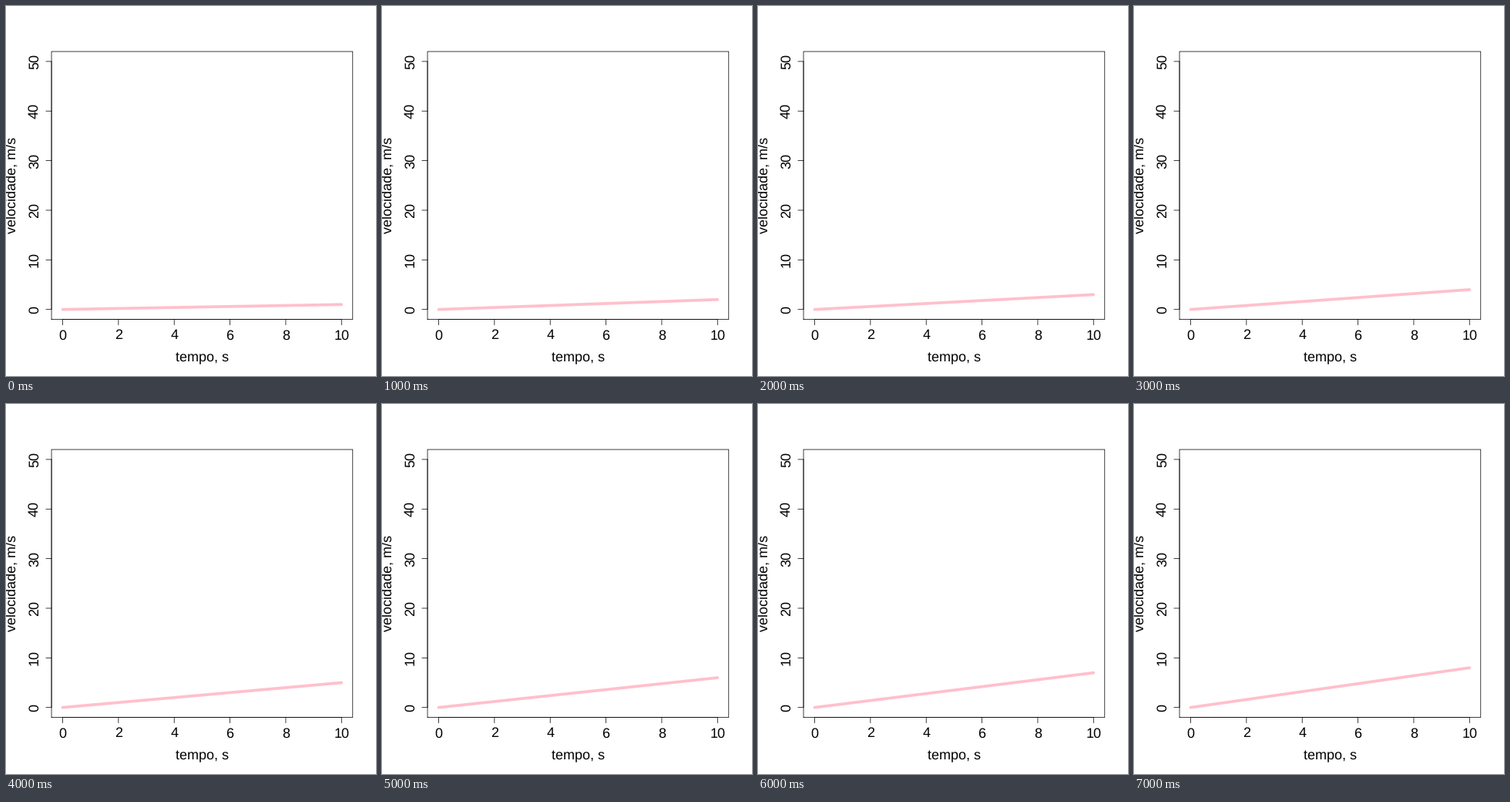
Animation of 480x480 px, one loop 8 s. Source, as a matplotlib script:

```python
import matplotlib.pyplot as plt
from matplotlib.animation import FuncAnimation

SIZE, DPI = 480, 72
LEFT, RIGHT, TOP, BOTTOM = 59.04, 449.76, 59.04, 406.56
TICK, THIN, THICK = 7.2, 0.75, 3.75
FRAMES, INTERVAL = 8, 1000

plt.rcParams.update({
    "font.family": "Liberation Sans",
    "font.size": 18,
    "text.hinting": "none",
    "lines.solid_capstyle": "round",
    "lines.solid_joinstyle": "round",
})

fig = plt.figure(figsize=(SIZE / DPI, SIZE / DPI), dpi=DPI, facecolor="white")
ax = fig.add_axes([0, 0, 1, 1])
ax.set_xlim(0, SIZE)
ax.set_ylim(SIZE, 0)
ax.axis("off")


def px(t):
    """Time in seconds to stage x, with 4% padding at both ends."""
    return LEFT + (RIGHT - LEFT) * (t / 10 + 0.04) / 1.08


def py(v):
    """Speed in m/s to stage y, with 4% padding at both ends."""
    return BOTTOM - (BOTTOM - TOP) * (v / 50 + 0.04) / 1.08


def stroke(xs, ys, color="black", width=THIN):
    return ax.plot(xs, ys, color=color, lw=width, snap=False)[0]


def label(x, y, text, angle=0):
    ax.text(x, y, text, rotation=angle, rotation_mode="anchor",
            ha="center", va="baseline", color="black")


curve = stroke([], [], "pink", THICK)

# Axes, ticks and frame
stroke([px(0), px(10)], [BOTTOM, BOTTOM])
for t in range(0, 11, 2):
    stroke([px(t), px(t)], [BOTTOM, BOTTOM + TICK])
    label(px(t), 432.48, str(t))

stroke([LEFT, LEFT], [py(0), py(50)])
for v in range(0, 51, 10):
    stroke([LEFT, LEFT - TICK], [py(v), py(v)])
    label(41.76, py(v), str(v), 90)

stroke([LEFT, RIGHT, RIGHT, LEFT, LEFT], [BOTTOM, BOTTOM, TOP, TOP, BOTTOM])

label((LEFT + RIGHT) / 2, 461.28, "tempo, s")
label(12.96, (TOP + BOTTOM) / 2, "velocidade, m/s", 90)


def update(i):
    acceleration = 0.1 * (i + 1)
    curve.set_data([px(0), px(10)], [py(0), py(10 * acceleration)])
    return [curve]


anim = FuncAnimation(fig, update, frames=FRAMES, interval=INTERVAL,
                     repeat=True, repeat_delay=0)
plt.show()
```
